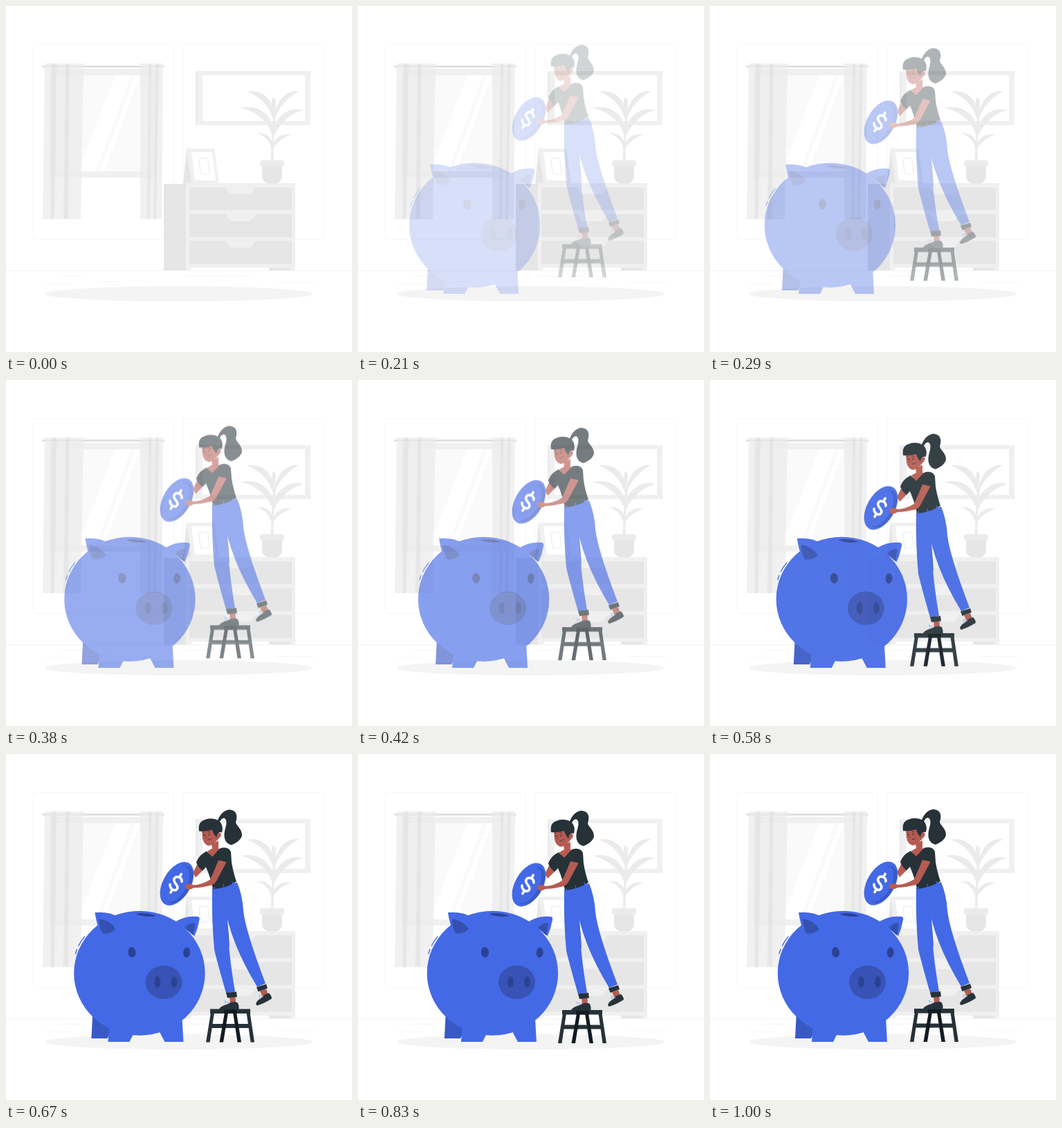
An HTML page that plays this animation: 500 by 500 pixels, repeating every 1040 ms.

```html
<!DOCTYPE html>
<html lang="en">
<head>
<meta charset="utf-8">
<title>Piggy bank</title>
<style>
  html, body { margin: 0; width: 100%; height: 100%; overflow: hidden; background: #fff; }
  svg { display: block; width: 100%; height: 100%; }
  .line { fill: none; stroke-linecap: round; stroke-linejoin: round; }
  .e0 { fill: #e0e0e0; } .e6 { fill: #e6e6e6; } .eb { fill: #ebebeb; }
  .f0 { fill: #f0f0f0; } .fa { fill: #fafafa; } .white { fill: #fff; }
  .blue { fill: #4469e6; } .shade { fill: #3959c5; } .navy { fill: #2b4293; }
  .skin { fill: #b55b52; } .ink { fill: #263238; } .deep { fill: #111b21; }
</style>
</head>
<body>
<svg viewBox="0 0 500 500">
  <defs>
    <g id="drawer">
      <path class="e6" d="M265 0H413V33H265Z"/>
      <path class="f0" d="M315-1C320 0 319 10 329 10H349C358 10 357 0 363-1Z"/>
    </g>
  </defs>

  <g id="room">
    <g class="line" stroke="#f7f7f7">
      <rect x="39.5" y="55.5" width="203" height="282" rx="3"/>
      <rect x="255.5" y="55.5" width="203" height="282" rx="3"/>
      <path stroke="#f2f2f2" d="M0 382.5H500"/>
      <path d="M80 390.5H112M57 401.5H95M136 398.5H160M260 390.5H325M332 390.5H353M392 399.5H448"/>
    </g>

    <g id="window">
      <path class="f0" d="M63 91H218V248H63Z"/>
      <path class="fa" d="M72 100H209V239H72Z"/>
      <path class="white" d="M158 100H181L130 239H104ZM187 100H194L142 239H135Z"/>
      <path class="e0" d="M53 86H228Q230 87.500 228 89H53Q51 87.500 53 86Z"/>
      <path fill="#ececec" opacity=".72" d="M56 83H112L108 308H53ZM194 83H227L225 308H194Z"/>
      <path fill="#dedede" opacity=".5" d="M66 83H73L70 308H64ZM86 83H92L90 308H83ZM206 83H210L208 308H204ZM217 83H221L217 308H213Z"/>
    </g>

    <path class="f0" d="M274 94H440V172H274Z"/>
    <path class="eb" d="M274 94H276V172H274Z"/>
    <path class="white" d="M284 100H432V166H284Z"/>

    <g id="plant" class="eb">
      <path d="M384 136Q387 128 390 137L389 165Q386 200 386.500 224H382.500Q385 180 386 165Z"/>
      <path d="M387 166C380 145 370 132 348 124C370 119 386 136 388 156C392 137 404 121 424 123C405 132 394 148 387 166Z"/>
      <path d="M386 190C380 169 366 154 339 147C365 142 382 156 387 177C393 157 408 146 430 150C407 157 395 171 386 190Z"/>
      <path d="M384 209C382 196 375 187 362 184C376 182 384 190 386 200C390 189 399 184 412 186C398 191 390 198 384 209Z"/>
      <path class="e6" d="M370 231H399V244Q399 257 385 257Q370 257 370 244Z"/>
      <rect x="367" y="223" width="35" height="9" rx="3"/>
    </g>

    <g id="photo">
      <path class="e6" d="M261 206L256 257H270Z"/>
      <path class="f0" d="M261 206H301L308 257H268Z"/>
      <path class="white" d="M268 211H298L303 252H273Z"/>
      <path class="line" stroke="#ebebeb" d="M282 220H289Q292 220 292 223L294 240Q294 243 291 243H284Q281 243 281 240L279 223Q279 220 282 220Z"/>
    </g>

    <g id="dresser">
      <path class="e6" d="M228 257H261V382H228Z"/>
      <path class="f0" d="M260 256H418V382H411V378H269L267 382H260Z"/>
      <path class="e6" d="M380 378H411V382H380Z"/>
      <use href="#drawer" y="262"/>
      <use href="#drawer" y="301"/>
      <use href="#drawer" y="339.500"/>
    </g>
    <ellipse cx="249.500" cy="416" rx="193.500" ry="11" fill="#f4f4f4"/>
  </g>

  <g id="pig">
    <path class="shade" d="M125 372L123 411H146L153 398Z"/>
    <g class="blue">
      <ellipse cx="192.500" cy="316.700" rx="94.700" ry="90"/>
      <path d="M150 380L147 416H178L187 398ZM219 397L229 416H256L254 380Z"/>
      <path d="M128 229Q148 227 163 236L136 259Q130 243 128 229Z"/>
      <path d="M245 242Q260 233 277 235Q280 236 279 240Q277 252 272 263Z"/>
    </g>
    <path fill="#3451b1" d="M134 238Q151 241 158 253Q150 261 139 259Q134 250 134 238ZM258 251Q264 244 273 244Q272 254 270 262Z"/>
    <path class="navy" d="M187 231Q203 228 217 234Q202 237 187 231Z"/>
    <ellipse cx="227.500" cy="329.700" rx="26.500" ry="24.300" fill="#3853b5"/>
    <g class="navy">
      <ellipse cx="181.500" cy="286.500" rx="5.500" ry="7.500" transform="rotate(-6 181.500 286.500)"/>
      <ellipse cx="260.700" cy="286.700" rx="4.900" ry="7.500" transform="rotate(5 260.700 286.700)"/>
      <ellipse cx="218.500" cy="329.500" rx="4.500" ry="8.300"/>
      <ellipse cx="242.500" cy="329.500" rx="4.500" ry="8.300"/>
    </g>
    <path class="line" stroke="#4469e6" stroke-width="1.400" d="M113 264Q108 270 104.500 277M102 282.500L100 288.500"/>
  </g>

  <g id="girl">
    <g id="stool">
      <path class="deep" d="M316 373H321L314 416H308.500ZM328 373H333L340 416H334.500Z"/>
      <path class="ink" d="M295 368H353V374.500H295ZM297 389.500H351V395.500H297Z"/>
      <path class="deep" d="M315 368H334V374.500H315ZM313 389.500H318V395.500H312ZM331 389.500H336V395.500H332Z"/>
      <path class="ink" d="M296 373H301L294.500 416H289ZM347.500 373H352.500L359 416H353.500Z"/>
    </g>

    <path class="skin" d="M323 350H331.500L332 361H324ZM367 342L376 339L379 347L371 351Z"/>
    <path class="ink" d="M308 368Q310 364 320 361Q328 356 335 359Q337 363 336.500 369H309ZM361 361Q362 356 369 352Q372 347 380 345Q384 349 384 353Q373 360 363 363Z"/>
    <path class="line" stroke="#b9c5ed" stroke-width="1.600" d="M322 359L316 356.500L318 360.500M371 350L366 348L367 353"/>

    <path class="blue" d="M313 191L334 185Q342 205 343 226Q346 255 375 331L363 336Q323 270 315 214Z"/>
    <path class="shade" d="M315 212Q321 235 323 280L316 260Z"/>
    <path class="blue" d="M298 194L319 188Q317 208 320 240Q321 285 331 343L318 345Q304 296 301 282Q297 240 298 194Z"/>
    <path class="ink" d="M318 344.500L333 343L334 350.500L320 352ZM362 336.500L376 332L378 338L364.500 343Z"/>

    <path class="skin" d="M278 156L286 166L274 178L270 171Z"/>
    <g id="coin" transform="translate(247 187) rotate(30)">
      <ellipse rx="20" ry="34.500" class="blue"/>
      <ellipse cx="2.500" rx="16.700" ry="30" class="shade"/>
      <ellipse cx="-.8" cy="1" rx="15.500" ry="28.800" class="blue"/>
      <path class="line" stroke="#fff" stroke-width="3.600" d="M4.500-6C2-12-7-10-7-4.500C-7 2 4 0 4 6C4 12-5 12-8 6M-1.500-15V-11M-1.500 11V15.500"/>
    </g>

    <path class="skin" d="M297 129L307 125L307 136L315 141L299 152L291 140L298 136Z"/>
    <path class="ink" d="M290 140L298 148L309 136Q321 132 325 141L326 156Q328 169 333 184Q319 193 299 195Q296 179 289 163L284 168Q278 164 275 156Q279 145 290 140Z"/>
    <path class="line" stroke="#4469e6" stroke-width="1" d="M301 192V196M314 188L315 193M327 184L328 189"/>
    <path class="skin" d="M307 153L319 155Q310 172 304 183Q301 189 293 190Q281 193 271 193Q265 197 260 194L259 189Q265 185 271 189Q284 188 295 181Q301 168 307 153Z"/>
    <path class="ink" d="M305 152L309 142L324 143L320 156Z"/>

    <path class="ink" d="M304 101C307 90 313 81 322 80C334 80 335 90 332 98C333 104 341 107 341 117C340 124 331 129 326 131C317 129 314 121 316 111C318 103 321 95 315 92Q309 93 308 102Z"/>
    <path class="skin" d="M283 106L303 104L308 113Q312 116 308 121Q305 125 302 127Q298 132 292 132Q285 129 284 121Z"/>
    <path class="ink" d="M279 111Q277 98 286 95Q297 90 308 96Q315 103 312 113Q309 112 306 114L304 120Q299 114 298 109Q288 112 279 111Z"/>
    <path class="skin" d="M305 116Q308 111 311 115Q310 122 305 122Z"/>
    <circle class="ink" cx="286" cy="116.500" r="1"/>
    <circle class="ink" cx="293.500" cy="116" r="1"/>
    <path class="line" stroke="#263238" stroke-width=".8" d="M284 113L286 112.500M292 112L295 112.500M292 123.500Q295 124 297 121.500"/>
    <path class="line" stroke="#8d4039" stroke-width=".8" d="M289 116L287.500 120.500H290"/>
  </g>
</svg>
<script>
const LOOP = 1040, FPS = 24, LEAD = 0.03, FIRST_STEP = 3, SLIDE = 30;
const pig = document.getElementById('pig');
const girl = document.getElementById('girl');

const bezier = (a, b, s) => 3 * a * s * (1 - s) ** 2 + 3 * b * s * s * (1 - s) + s ** 3;

// cubic-bezier(.36, -.01, .5, 1.38), solved by bisection
function ease(t) {
  if (t >= 1) return 1;
  let low = 0, high = 1;
  for (let i = 0; i < 24; i++) {
    const mid = (low + high) / 2;
    if (bezier(.36, .5, mid) < t) low = mid; else high = mid;
  }
  return bezier(-.01, 1.38, low);
}

function place(part, x, y, opacity) {
  part.setAttribute('transform', `translate(${x} ${y})`);
  part.setAttribute('opacity', opacity);
}

function draw() {
  const ms = performance.now() % LOOP;
  const step = Math.floor((ms + 5) * FPS / 1000);
  const progress = step < FIRST_STEP ? 0 : ease(step / FPS + LEAD);
  const offset = SLIDE * (progress - 1);
  const opacity = Math.min(1, progress);
  place(pig, offset, 0, opacity);
  place(girl, 0, offset, opacity);
  requestAnimationFrame(draw);
}
draw();
</script>
</body>
</html>
```
